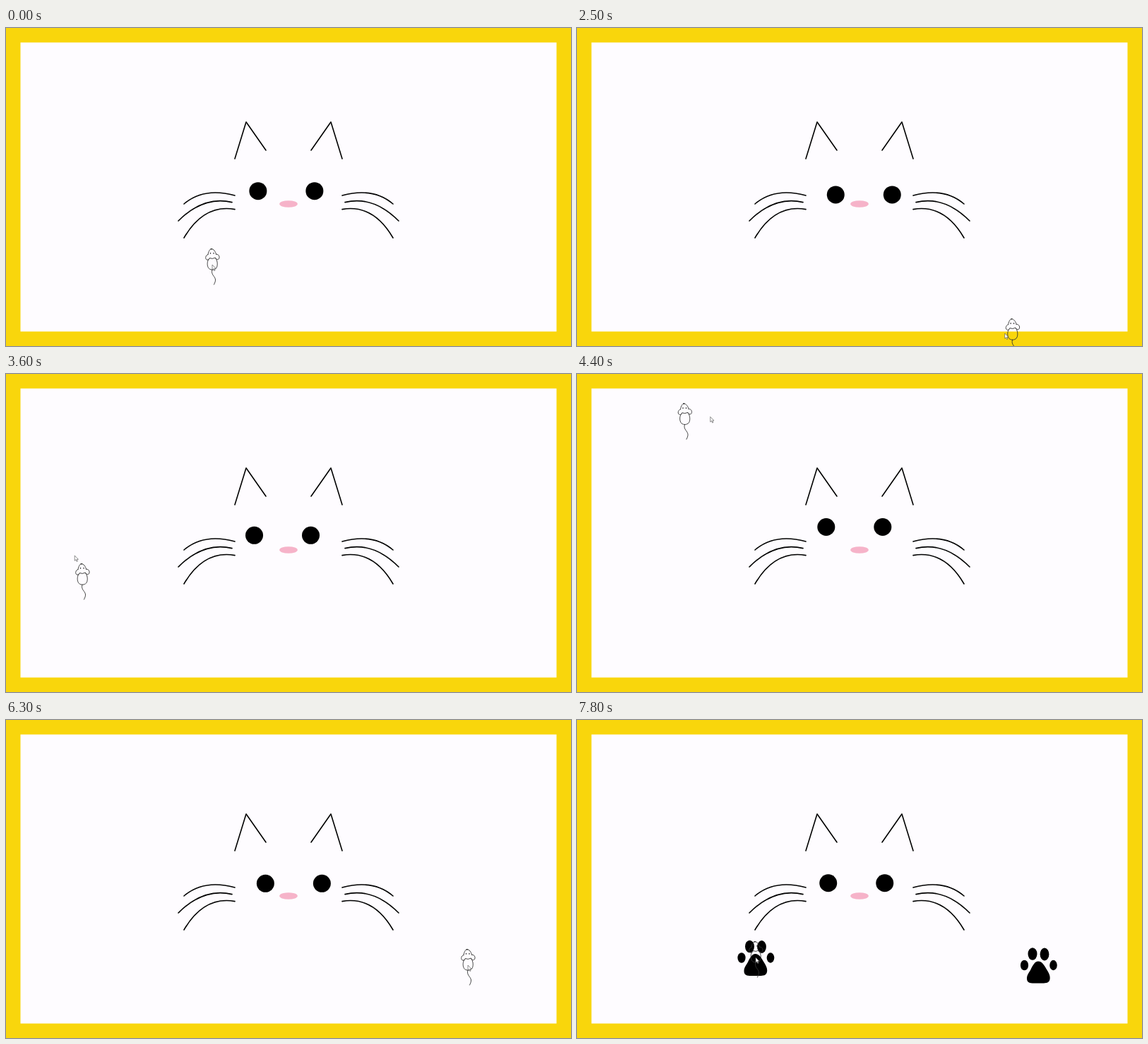
An HTML page for the animation above (8000 ms loop, 800 by 450 pixels).

```html
<!DOCTYPE html>
<html lang="en">
<head>
<meta charset="utf-8">
<title>Cat and mouse</title>
<style>
  html, body { margin: 0; width: 100%; height: 100%; overflow: hidden; background: #f9d60c; }
  svg { display: block; width: 100%; height: 100%; }
</style>
</head>
<body>
<svg viewBox="0 0 800 450">
  <defs>
    <g id="half" fill="none" stroke="#000" stroke-width="1.6" stroke-linecap="round" stroke-linejoin="round">
      <path d="M324 185L340 133L368 173"/>
      <path d="M252 249Q280 225 324 237"/>
      <path d="M244 273Q280 237 320 246.6"/>
      <path d="M252 297Q280 249 324 256.6"/>
    </g>
    <g id="paw">
      <ellipse cx="-20.5" cy="-2" rx="5.6" ry="7.3"/>
      <ellipse cx="-9" cy="-18" rx="6.5" ry="8.8"/>
      <ellipse cx="8" cy="-17.5" rx="6.4" ry="9"/>
      <ellipse cx="20.5" cy="-2" rx="5.3" ry="7.2"/>
      <path d="M-1 -7.5C5 -7.5 8 -1 11 4S16.500 13 15.500 18S10 23.500 5 23.500H-7C-13 23.500 -17 22.500 -17 17S-14 9 -11.500 4S-6 -7.500 -1 -7.500Z"/>
    </g>
  </defs>
  <rect width="800" height="450" fill="#f9d60c"/>
  <rect x="20.5" y="20.5" width="759" height="409" fill="#fefcff"/>
  <use href="#half"/>
  <use href="#half" transform="matrix(-1 0 0 1 800 0)"/>
  <g id="eyes">
    <circle cx="-40" r="12.5"/>
    <circle cx="40" r="12.5"/>
  </g>
  <ellipse cx="400" cy="249" rx="12.8" ry="4.8" fill="#f6b3c9"/>
  <use id="pawR" href="#paw" transform="translate(654 349)"/>
  <use id="pawL" href="#paw" transform="translate(253.5 338.5)"/>
  <g id="mouse" fill="none" stroke="#333" stroke-width=".9" stroke-linecap="round" stroke-linejoin="round">
    <path d="M-6 -16.5C-5.5 -20 -3.5 -24.5 -1 -24.5S5 -20.5 5.5 -16.8"/>
    <path d="M-6 -16.5C-10 -15.5 -10.5 -9.5 -7 -8.8C-5.5 -8.5 -4.5 -10 -3.8 -11.5Q0 -9.5 4.5 -12C5.5 -8.8 9.5 -8.3 10 -12C10.3 -15 8 -17.3 5.5 -16.8"/>
    <path d="M-4.2 -10.5C-8 -7.5 -7.5 1 -4.5 3.5S3 5.5 5.5 3S8 -8 4.7 -11"/>
    <path d="M0 5C-2.5 12 4 14 4.5 19C4.7 21.5 3.5 24 2.5 26"/>
    <path d="M-2.5 -18.5v.6M2 -18.5v.6M-1.8 -24.3h1.2" stroke-width="1.4"/>
  </g>
  <path id="cursor" d="M0 0V7.3L1.7 5.8L2.900 8.500L4.100 8L2.900 5.400H5.200Z" fill="#fff" stroke="#444" stroke-width=".6"/>
</svg>
<script>
const LOOP = 8000, STEP = 100, LEAD = 95;

// Waypoints of the mouse: time, x, y
const path = [
  [300, 292, 337], [1200, 564, 399], [1300, 572, 395], [2000, 621, 437],
  [2400, 621, 437], [2600, 605, 434], [3300, 132, 380], [3600, 108, 293],
  [3900, 79, 180], [4200, 101, 80], [4600, 230, 61], [5100, 460, 99],
  [5200, 646, 141], [5300, 720, 157], [5500, 742, 205], [6000, 673, 352],
  [6300, 654, 349], [6500, 654, 349], [7000, 430, 369], [7400, 253, 338]
];

const el = id => document.getElementById(id);
const place = (id, x, y) => el(id).setAttribute("transform", `translate(${x.toFixed(2)} ${y.toFixed(2)})`);
const show = (id, on) => el(id).setAttribute("visibility", on ? "visible" : "hidden");

function slope(i, k) {
  const a = path[i], b = path[i + 1];
  return a && b ? (b[k] - a[k]) / (b[0] - a[0]) : 0;
}

// Harmonic mean of neighbouring slopes: smooth, without overshoot
function tangent(i, k) {
  const a = slope(i - 1, k), b = slope(i, k);
  return a * b > 0 ? 2 * a * b / (a + b) : 0;
}

function at(t) {
  const last = path.length - 1;
  if (t <= path[0][0]) return path[0].slice(1);
  if (t >= path[last][0]) return path[last].slice(1);
  const i = path.findIndex(p => p[0] > t) - 1;
  const a = path[i], b = path[i + 1], h = b[0] - a[0], u = (t - a[0]) / h;
  const e = u * u * (3 - 2 * u);
  return [1, 2].map(k => a[k] + (b[k] - a[k]) * e
    + h * u * (1 - u) * (tangent(i, k) * (1 - u) - tangent(i + 1, k) * u));
}

function draw(time) {
  const t = Math.floor(time % LOOP / STEP) * STEP;
  const [x, y] = at(t), [px, py] = at(t - STEP);
  const idle = x === px && y === py;
  const [cx, cy] = at(idle ? t : t + LEAD);
  place("mouse", x, y);
  place("cursor", cx, cy - 2);
  place("eyes", 400 + (x - 400) * .029, 224.8 + (y - 225) * .0525);
  show("pawR", t >= 6600);
  show("pawL", t >= 7600);
}

const start = performance.now();
function tick() {
  draw(performance.now() - start);
  requestAnimationFrame(tick);
}
tick();
</script>
</body>
</html>
```
